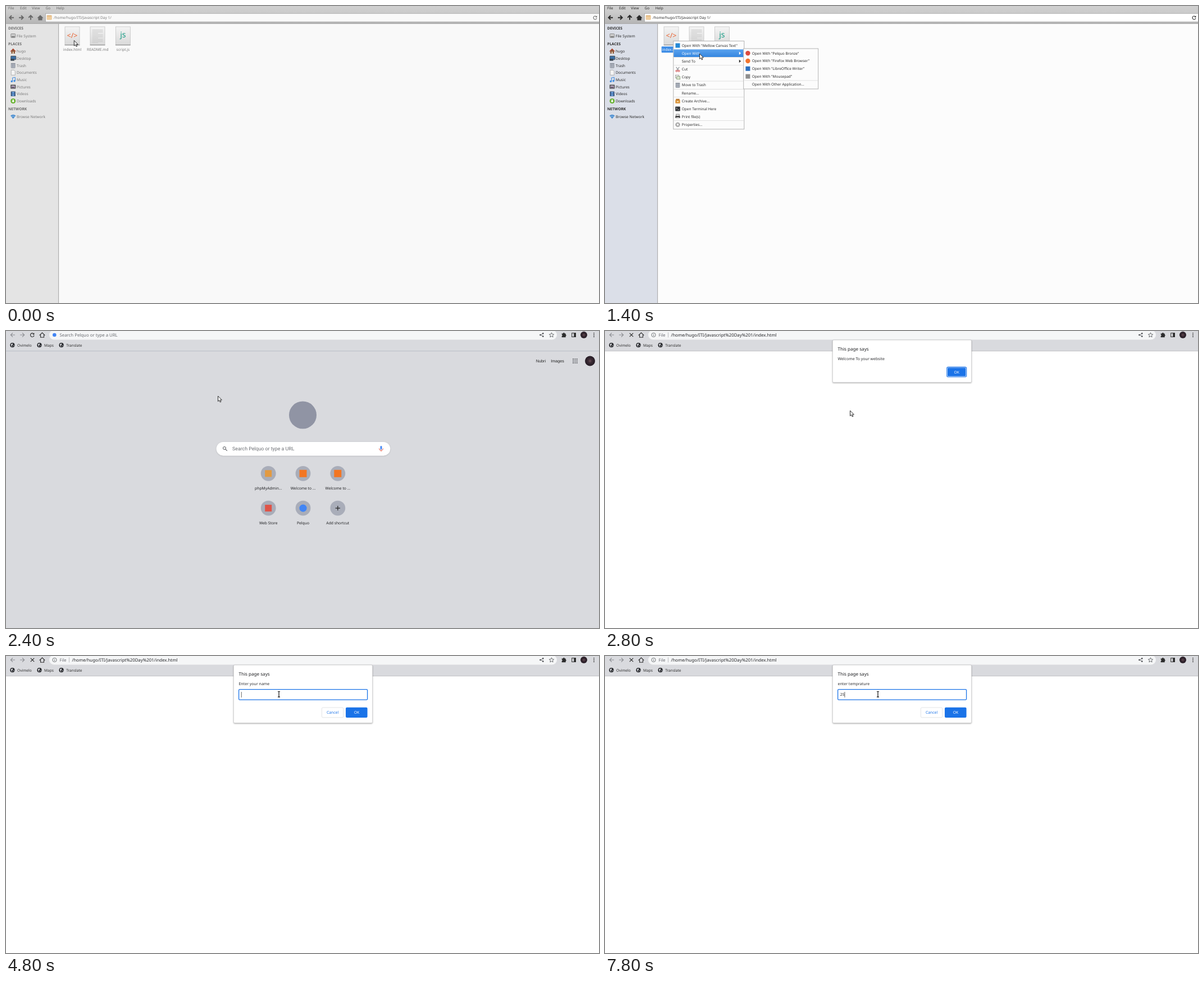
Recreate the animation shown at these times as an HTML page. Size 1056 px wide and 530 px high, loop 8000 ms.

```html
<!DOCTYPE html>
<html lang="en">
<head>
<meta charset="utf-8">
<title>Files and prompts</title>
<style>
  html, body { margin: 0; width: 100%; height: 100%; overflow: hidden; background: #fff; }
  svg { display: block; width: 100vw; height: 100vh; }
  text { font-family: "Noto Sans", sans-serif; text-rendering: geometricPrecision; white-space: pre; }
  .rob { font-family: Roboto, sans-serif; }
  .lib { font-family: "Liberation Sans", Arial, sans-serif; }
</style>
</head>
<body>
<svg id="stage" viewBox="0 0 1056 530"></svg>
<script>
const LOOP = 8000, TICK = 100;
const INK = '#2c2c2c', BLUE = '#1a73e8', BAR = '#d9dade';
const USER = 'hugo';

const rect = (x, y, w, h, fill, more = '') =>
  `<rect x="${x}" y="${y}" width="${w}" height="${h}" fill="${fill}" ${more}/>`;
const disc = (x, y, r, fill, more = '') =>
  `<circle cx="${x}" cy="${y}" r="${r}" fill="${fill}" ${more}/>`;
const path = (d, fill, stroke = 'none', w = 1) =>
  `<path d="${d}" fill="${fill}" stroke="${stroke}" stroke-width="${w}"/>`;
const line = (d, stroke = INK, w = 1) => path(d, 'none', stroke, w);
const text = (x, y, s, size = 6.55, fill = INK, more = '') =>
  `<text x="${x}" y="${y}" font-size="${size}" fill="${fill}" ${more}>${s}</text>`;
const mid = 'text-anchor="middle"';
const at = (x, y, body) => `<g transform="translate(${x} ${y})">${body}</g>`;
const gray = (a, b, k) => mix([a, a, a], [b, b, b], k);
const mix = (a, b, k) => `rgb(${a.map((v, i) => Math.round(v + (b[i] - v) * k))})`;

const defs = `<defs>
  <linearGradient id="tool" x2="0" y2="1"><stop stop-color="#d0d0d0"/><stop offset=".35" stop-color="#cbcbcb"/><stop offset="1" stop-color="#b4b4b4"/></linearGradient>
  <linearGradient id="paper" x2="0" y2="1"><stop stop-color="#f4f4f4"/><stop offset="1" stop-color="#d9d9d9"/></linearGradient>
  <linearGradient id="pick" x2="0" y2="1"><stop stop-color="#5aa2ee"/><stop offset="1" stop-color="#3587e0"/></linearGradient>
  <radialGradient id="face"><stop stop-color="#6b5057"/><stop offset=".4" stop-color="#3a2a33"/><stop offset="1" stop-color="#241b24"/></radialGradient>
  <filter id="soft" x="-10%" y="-20%" width="120%" height="150%"><feDropShadow dx="0" dy="1" stdDeviation="1.3" flood-opacity=".35"/></filter>
  <filter id="faint" x="-10%" y="-20%" width="120%" height="150%"><feDropShadow dx="0" dy=".6" stdDeviation="1.2" flood-opacity=".2"/></filter>
</defs>`;

// Small pictures, each centred on 0,0
const icon = {
  disk: rect(-4, -3.5, 8, 7, '#c9c9c9', 'rx="1" stroke="#777" stroke-width=".7"') + rect(-3, 1, 6, 1.5, '#666'),
  house: path('M-4.5 .5L0-4L4.5 .5L3.3 .5V4.3H-3.3V.5Z', '#8a5a3c') + path('M-4.5 .5L0-4L4.5 .5', 'none', '#b3402a', 1.2) + rect(-1, 1, 2, 3.3, '#f0dcc0'),
  desk: rect(-4, -4, 9, 6.5, '#3b6fa5', 'rx=".6" stroke="#333" stroke-width=".7"') + rect(-4.5, 1, 6.5, 3.4, '#37444f'),
  bin: rect(-3.5, -3, 7, 7.5, '#b9bfc9', 'rx=".8" stroke="#7b818c" stroke-width=".7"') + line('M-4-3.5H4M-1.3-2V3.4M1.3-2V3.4', '#737987', .8),
  doc: path('M-3.5-4.5H1.6L3.6-2.5V4.5H-3.5Z', '#f4f4f4', '#999', .7),
  note: disc(-2.5, 3, 1.7, '#3c8ae0') + disc(2.3, 2.2, 1.7, '#3c8ae0') + line('M-1.1 3V-3.4L3.7-4.2V2', '#3c8ae0', 1),
  photo: rect(-4.5, -3.5, 9, 7, '#4a4a4a', 'rx=".5"') + rect(-3, -2.2, 6, 4.4, '#b5a6bd') + path('M-3 2.2L-.5-.6L3 2.2Z', '#5c4d68'),
  film: rect(-4, -4.3, 8, 8.6, '#2d4a72', 'rx=".5"') + rect(-2.3, -3.3, 4.6, 3, '#6ba0dd') + rect(-2.3, .6, 4.6, 3, '#6ba0dd'),
  down: disc(0, 0, 4.5, '#68b232') + path('M-1-2.7H1V0H2.7L0 2.8L-2.7 0H-1Z', '#fff'),
  wifi: path('M-4.7-1.4Q0-5.3 4.7-1.4L0 4Z', '#4d8fd0') + line('M-2.9 .3Q0-2 2.9 .3', '#b9d8f4', .7),
  square: c => rect(-4, -4, 8, 8, c),
  round: c => disc(0, 0, 4.2, c),
  cut: line('M-2.8-4L1.4 2M2.8-4L-1.4 2', '#8b8f95', 1.1) + disc(-2, 3, 1.4, 'none', 'stroke="#c33" stroke-width="1"') + disc(2, 3, 1.4, 'none', 'stroke="#c33" stroke-width="1"'),
  copy: rect(-4, -3.6, 6, 5.4, '#eee', 'stroke="#888" stroke-width=".7"') + rect(-1.8, -1, 6, 5, '#dbe6d0', 'stroke="#6f8a5e" stroke-width=".7"'),
  box: rect(-4.2, -2, 8.4, 6, '#d9953c', 'rx=".6"') + rect(-3.2, -4, 6.4, 2.4, '#b8762c') + rect(-1.5, 0, 3, 1.5, '#fff1d0'),
  term: rect(-4.3, -4, 8.6, 8, '#2e3236', 'rx=".8"') + line('M-2.8-2L-1-.6L-2.8 .8M0 1.4H2.5', '#e8e8e8', .7),
  print: rect(-2.7, -4.2, 5.4, 3.6, '#eee', 'stroke="#555" stroke-width=".7"') + rect(-4.2, -1.4, 8.4, 4.2, '#444', 'rx=".8"') + rect(-2.7, 1.4, 5.4, 2.8, '#ddd'),
  gear: disc(0, 0, 3.4, 'none', 'stroke="#8c8c8c" stroke-width="1.6" stroke-dasharray="1.5 .6"') + disc(0, 0, 2.2, 'none', 'stroke="#8c8c8c" stroke-width=".8"'),
  globe: disc(0, 0, 4.1, '#25272b') + path('M-2.8-1.8L.2-3L1 -1.2L-1 .2L0 1.8L-1.2 3Z', BAR) + path('M1.6 .2L3.4 .6L2 2.4Z', BAR),
  dots: [-3.2, 0, 3.2].map(y => disc(0, y, .9, INK)).join('')
};
const pic = (x, y, name) => at(x, y, icon[name]);

const reload = (x, y, r, color) => at(x, y,
  line(`M${r * .7} ${-r * .7}A${r} ${r} 0 1 0 ${r} ${r * .3}`, color, 1.1) +
  path(`M${r + .4} ${-r - .5}V${-r * .15}H${r * .15}Z`, color));
const homeMark = (x, y, color, fill) => at(x, y, path('M-4.2 .2L0-4L4.2 .2H3V4.2H-3V.2Z', fill, color, 1.1));
const navArrow = (x, y, turn, color, w) =>
  `<g transform="translate(${x} ${y}) rotate(${turn})">${line('M4 0H-3.4M0-3.7L-3.7 0L0 3.7', color, w)}</g>`;

const places = [
  [53, 'disk', 'File System'], [80.6, 'house', USER], [93.3, 'desk', 'Desktop'], [106, 'bin', 'Trash'],
  [118.8, 'doc', 'Documents'], [131.5, 'note', 'Music'], [144.1, 'photo', 'Pictures'],
  [156.8, 'film', 'Videos'], [169.5, 'down', 'Downloads'], [197.2, 'wifi', 'Browse Network']
];

function fileIcon(x, inner) {
  return rect(x - 13, 37, 26, 32.5, 'url(#paper)', 'stroke="#bdbdbd" stroke-width=".7"') +
    rect(x - 13.4, 69, 26.8, 1.2, '#8d8d8d') + inner;
}

// awake: 0 unfocused window, 1 focused with the first file selected
function files(awake) {
  const ink = gray(122, 42, awake), strong = gray(104, 42, awake);
  let s = rect(0, 0, 1056, 530, gray(249, 252, awake)) +
    rect(0, 32, 93.5, 498, mix([228, 228, 228], [219, 223, 232], awake)) +
    rect(93.2, 32, .9, 498, '#9b9b9b') + rect(0, 0, 1056, 32, 'url(#tool)') + rect(0, 31.2, 1056, .8, '#a8a8a8') +
    rect(70.6, 13.3, 1000, 14.9, gray(249, 255, awake), 'stroke="#a2a2a2" stroke-width=".7"');
  [[4, 'File'], [25, 'Edit'], [46, 'View'], [70.5, 'Go'], [89.5, 'Help']]
    .forEach(([x, w]) => s += text(x, 6, w, 6.55, strong));
  s += navArrow(10, 20.7, 0, strong, 2) + navArrow(27, 20.7, 180, strong, 2) + navArrow(44, 20.7, 90, strong, 2) +
    homeMark(61, 20.7, strong, strong) + rect(72.7, 16.5, 8.8, 8, '#e2b67c', 'rx="1"') + rect(73, 18.5, 8.2, 5.7, '#efcd9d', 'rx=".6"') +
    text(85, 23, `/home/${USER}/ITI/Javascript Day 1/`, 6.55, ink) + reload(1049, 20.8, 3, strong);
  [[42, 'DEVICES'], [69.6, 'PLACES'], [186, 'NETWORK']]
    .forEach(([y, w]) => s += text(4, y, w, 6.6, strong, 'font-weight="700"'));
  places.forEach(([y, name, label]) => s += pic(12.7, y, name) + text(19, y + 2.5, label, 6.6, ink));

  let rows = '';
  for (let i = 0; i < 12; i++) rows += `M153.5 ${42.5 + i * 2.1}H${i % 4 === 3 ? 164 : 172.5}`;
  s += fileIcon(118, text(118, 57.4, '&lt;/&gt;', 12.5, '#ea602d', mid)) +
    fileIcon(163, line(rows, '#c2c2c2', .7)) +
    fileIcon(208.3, text(208.3, 56.4, 'js', 14, '#159a83', mid));
  if (awake) s += rect(100.7, 72.3, 34.6, 11, '#3c8ce6', 'rx="1"');
  return s + text(118, 80.4, 'index.html', 6.5, awake ? '#fff' : ink, mid) +
    text(163.3, 80.4, 'README.md', 6.6, ink, mid) + text(208.3, 80.4, 'script.js', 6.5, ink, mid);
}

// Rows: [centre y, label, picture, has submenu]
const mainRows = [
  [70.5, 'Open With "Mellow Canvas Text"', icon.square('#2489d6')], [84.2, 'Open With', '', 1], [98.5, 'Send To', '', 1],
  [112.9, 'Cut', icon.cut], [126.8, 'Copy', icon.copy], [141, 'Move to Trash', icon.bin], [155.3, 'Rename...', ''],
  [169.7, 'Create Archive...', icon.box], [183.5, 'Open Terminal Here', icon.term],
  [197.3, 'Print file(s)', icon.print], [211.7, 'Properties...', icon.gear]
];
const subRows = [
  [84.2, 'Open With "Pelquo Bronze"', icon.round('#dd4b3e')], [98, 'Open With "Firefox Web Browser"', icon.round('#f2752e')],
  [111.8, 'Open With "LibreOffice Writer"', icon.square('#2a6fc0')], [125.6, 'Open With "Mousepad"', icon.square('#8e8e8e')],
  [139.9, 'Open With Other Application...', '']
];

function menu(x, y, w, h, rows, lines, picked) {
  let s = rect(x, y, w, h, '#fcfcfc', 'stroke="#b3b3b3" stroke-width="1"');
  lines.forEach(v => s += rect(x + 1, v, w - 2, .7, '#d4d4d4'));
  rows.forEach(([cy, label, art, more], i) => {
    const ink = i === picked ? '#fff' : INK;
    if (i === picked) s += rect(x + .5, cy - 6.8, w - 1, 13.6, 'url(#pick)');
    if (art) s += at(x + 7.7, cy, art);
    s += text(x + 15, cy + 2.4, label, 6.5, ink);
    if (more) s += path(`M${x + 117} ${cy - 2.7}V${cy + 2.7}L${x + 120.3} ${cy}Z`, ink);
  });
  return s;
}

function chrome(loading) {
  const dim = '#8b8c91';
  let s = rect(0, 0, 1056, 36, BAR) + rect(0, 35.4, 1056, .8, loading ? '#b7b8bb' : '#aeb6be') +
    navArrow(12, 7, 0, dim, 1.1) + navArrow(29, 7, 180, dim, 1.1) + homeMark(64.5, 7, INK, 'none') +
    rect(77, -1.5, 904, 17, '#f5f6f7', 'rx="8.5"');
  if (loading) s += line('M43.8 3.8L50.2 10.2M50.2 3.8L43.8 10.2', INK, 1.2) +
    disc(86.5, 7, 3.6, 'none', 'stroke="#55585c" stroke-width=".8"') + line('M86.5 6.6V9M86.5 5V5.8', '#55585c', .8) +
    text(95.5, 9.8, 'File', 7.6, '#6b6d72') + rect(112, 2.5, .7, 9, '#a4a6aa') +
    text(117.5, 9.8, `/home/${USER}/ITI/Javascript%20Day%201/index.html`, 7.8, '#27282b');
  else s += reload(46.7, 7, 3.3, INK) + disc(86.3, 7, 3.3, '#4285f4') +
    text(95.5, 9.8, 'Search Pelquo or type a URL', 7.8, '#6b6d72');
  [[11.4, 'Ovimelo'], [59.5, 'Maps'], [98.6, 'Translate']]
    .forEach(([x, w]) => s += pic(x, 25.2, 'globe') + text(x + 8.6, 27.5, w, 6.6));
  s += line('M956 4.7L951.6 7L956 9.3', '#4b4d51', .8) + [[956.3, 4.4], [951.4, 7], [956.3, 9.6]].map(([x, y]) => disc(x, y, 1.3, '#4b4d51')).join('') +
    line('M971.5 2.9L972.7 5.7L975.7 6L973.4 8L974.1 10.9L971.5 9.3L968.9 10.9L969.6 8L967.3 6L970.3 5.7Z', '#4b4d51', .8) +
    path('M989.7 4.5H992A1.4 1.4 0 0 1 994.8 4.5H996.7V6.5A1.4 1.4 0 0 1 996.7 9.2V11.2H989.7V9A1.4 1.4 0 0 0 989.7 6.3Z', INK) +
    rect(1007.7, 3.7, 6.8, 6.8, 'none', `stroke="${INK}" stroke-width="1"`) + rect(1011.3, 3.7, 3.2, 6.8, INK) +
    disc(1029, 7, 6, 'url(#face)') + pic(1047, 7, 'dots');
  return s;
}

function newTab() {
  let s = rect(0, 0, 1056, 530, BAR) + chrome(false) +
    text(943.8, 56, 'Nubri', 7.2, '#222', 'class="lib"') + text(970.3, 56, 'Images', 7.2, '#222', 'class="lib"');
  for (let i = 0; i < 9; i++) s += rect(1009.2 + i % 3 * 3.3, 49.3 + Math.floor(i / 3) * 3.3, 1.8, 1.8, '#505359');
  s += disc(1040, 53.5, 9, 'url(#face)') + disc(528.5, 150, 24.5, '#9094a4') +
    rect(374.7, 198, 309.5, 24.4, '#fff', 'rx="12.2" filter="url(#faint)"') +
    disc(389, 209, 2.5, 'none', 'stroke="#55585c" stroke-width="1"') + line('M390.8 210.8L393.8 213.8', '#55585c', 1.1) +
    text(403, 213.3, 'Search Pelquo or type a URL', 8.8, '#6c6f74', 'class="rob"') +
    rect(666.5, 205, 3, 6.4, '#4285f4', 'rx="1.5"') + line('M664.5 209.5A3.5 3.5 0 0 0 671.5 209.5M668 213V215.3', '#e0523f', .9);
  const tiles = [
    ['phpMyAdmin...', rect(-6, -6, 12, 12, '#e39a41')], ['Welcome to ...', rect(-6.5, -6.5, 13, 13, '#f37623')],
    ['Welcome to ...', rect(-6.5, -6.5, 13, 13, '#f37623')], ['Web Store', rect(-6, -6, 12, 12, '#df5347')],
    ['Pelquo', disc(0, 0, 6.6, '#4285f4')], ['Add shortcut', line('M-4.2 0H4.2M0-4.2V4.2', '#222', 1.2)]
  ];
  tiles.forEach(([label, art], i) => {
    const x = 467.2 + i % 3 * 61.8, y = 254.3 + Math.floor(i / 3) * 61.8;
    s += disc(x, y, 13.4, '#a9adb9') + at(x, y, art) + text(x, y + 28.5, label, 6.75, '#202124', mid);
  });
  return s;
}

const panel = (h, msg) => rect(405.3, 16, 247.4, h, '#fff', 'rx="2" filter="url(#soft)" stroke="#b9b9bb" stroke-width=".6"') +
  text(414.5, 34.6, 'This page says', 8.1, '#202124') + text(414.5, 51.6, msg, 6.97, '#2c2d30');

const alertBox = () => panel(75.7, 'Welcome To your website') +
  rect(608.7, 64.4, 35, 17.6, '#fff', `rx="2.4" stroke="${BLUE}" stroke-width="1.1"`) +
  rect(610, 65.6, 32.4, 15.2, BLUE, 'rx="1.6"') + text(626.2, 75.5, 'OK', 6.7, '#fff', mid);

// Advance widths in em, used to place the caret
const em = { h: .618, u: .618, g: .615, o: .605, 2: .572, 5: .572 };

function promptBox(msg, typed, caret, rise, alpha) {
  const end = 418.8 + [...typed].reduce((w, ch) => w + em[ch] * 6.8, 0);
  const body = panel(103.4, msg) +
    rect(414.6, 59.6, 229, 18.6, '#fff', `rx="1.6" stroke="${BLUE}" stroke-width="1.3"`) +
    text(418.8, 71.3, typed, 6.8) + (caret ? rect(end, 64, .7, 10, '#222') : '') +
    rect(562.4, 92, 38.4, 17.8, '#fff', 'rx="2" stroke="#d6d8dc" stroke-width=".7"') +
    text(581.6, 103.2, 'Cancel', 6.8, BLUE, mid) +
    rect(605, 91.7, 38.6, 18.3, BLUE, 'rx="2"') + text(624.4, 103.2, 'OK', 6.8, '#fff', mid);
  const k = 1 + rise * .0018;
  return `<g opacity="${alpha}" transform="translate(${529 * (1 - k)} ${-rise}) scale(${k} 1)">${body}</g>`;
}

// Pointer stops: time, x, y
const stops = [
  [0, 121.3, 61.5], [700, 126, 68], [800, 135, 78], [900, 143, 85], [1400, 168.5, 85], [1500, 203, 85], [1600, 246, 86],
  [1700, 284, 92], [1800, 310, 100], [1900, 324, 95], [2000, 331, 87], [2300, 355, 102], [2400, 377.5, 116], [2800, 436.5, 142],
  [3200, 545, 88], [3300, 609.5, 48.5], [3500, 614, 57], [3600, 620, 68], [3700, 623, 75], [3900, 586, 77],
  [4100, 556, 75], [4200, 512, 71], [4300, 486, 68.3]
];
const last = (list, t) => list.filter(s => s[0] <= t).pop();

function pointer(t) {
  const [, x, y] = last(stops, t);
  const beam = 'M-2-4.8H-.5L0-4.3L.5-4.8H2M0-4.3V4.3M-2 4.8H-.5L0 4.3L.5 4.8H2';
  return at(x, y, t >= 3900
    ? line(beam, '#fff', 2.2) + line(beam, '#111', 1.2)
    : path('M0 0V9.6L2.2 7.6L3.8 11L5.4 10.3L3.9 7.1H6.9Z', '#f4f4f4', '#1b1b1b', .9));
}

function desktop(t) {
  const fade = t < 300 ? 0 : t < 400 ? .5 : t < 500 ? .85 : 1;
  let s = files(fade);
  if (t >= 300 && t < 2200) {
    const row = t < 700 ? -1 : t < 800 ? 0 : 1;
    s += `<g opacity="${fade}">${menu(121.8, 62.5, 126, 157.3, mainRows, [91.2, 105.5, 133.7, 148, 162.3, 204.3], row)}</g>`;
    const [, x, y] = last(stops, t);
    if (t >= 1100) s += menu(246.7, 76, 133, 72, subRows, [132.6], x < 247 ? -1 : y < 91 ? 0 : 1);
  }
  return s;
}

const typing = [
  [3900, ''], [5400, 'h'], [5500, 'hu'], [5600, 'hug'], [5900, 'hugo'], [6200, ''], [7500, '2'], [7800, '25']
];

function scene(t) {
  let s = defs;
  if (t < 2400) s += desktop(t);
  if (t >= 2300 && t < 2800) s += `<g opacity="${t < 2400 ? .8 : 1}">${newTab()}</g>`;
  if (t >= 2800) s += rect(0, 0, 1056, 530, '#fff') + chrome(true);
  if (t >= 2800 && t < 3900) s += alertBox();
  if (t >= 3900) {
    const caret = !(t >= 4300 && t < 4800 || t >= 6600 && t < 7100);
    const [rise, alpha] = t < 4000 ? [3, .94] : t >= 6200 && t < 6300 ? [4.5, .85] : [0, 1];
    s += promptBox(t < 6200 ? 'Enter your name' : 'enter temprature', last(typing, t)[1], caret, rise, alpha);
  }
  return s + pointer(t);
}

const stage = document.getElementById('stage');
const start = performance.now();
let shown = -1;
function draw() {
  const t = Math.floor((performance.now() - start) % LOOP / TICK) * TICK;
  if (t !== shown) stage.innerHTML = scene(shown = t);
  requestAnimationFrame(draw);
}
draw();
</script>
</body>
</html>
```
